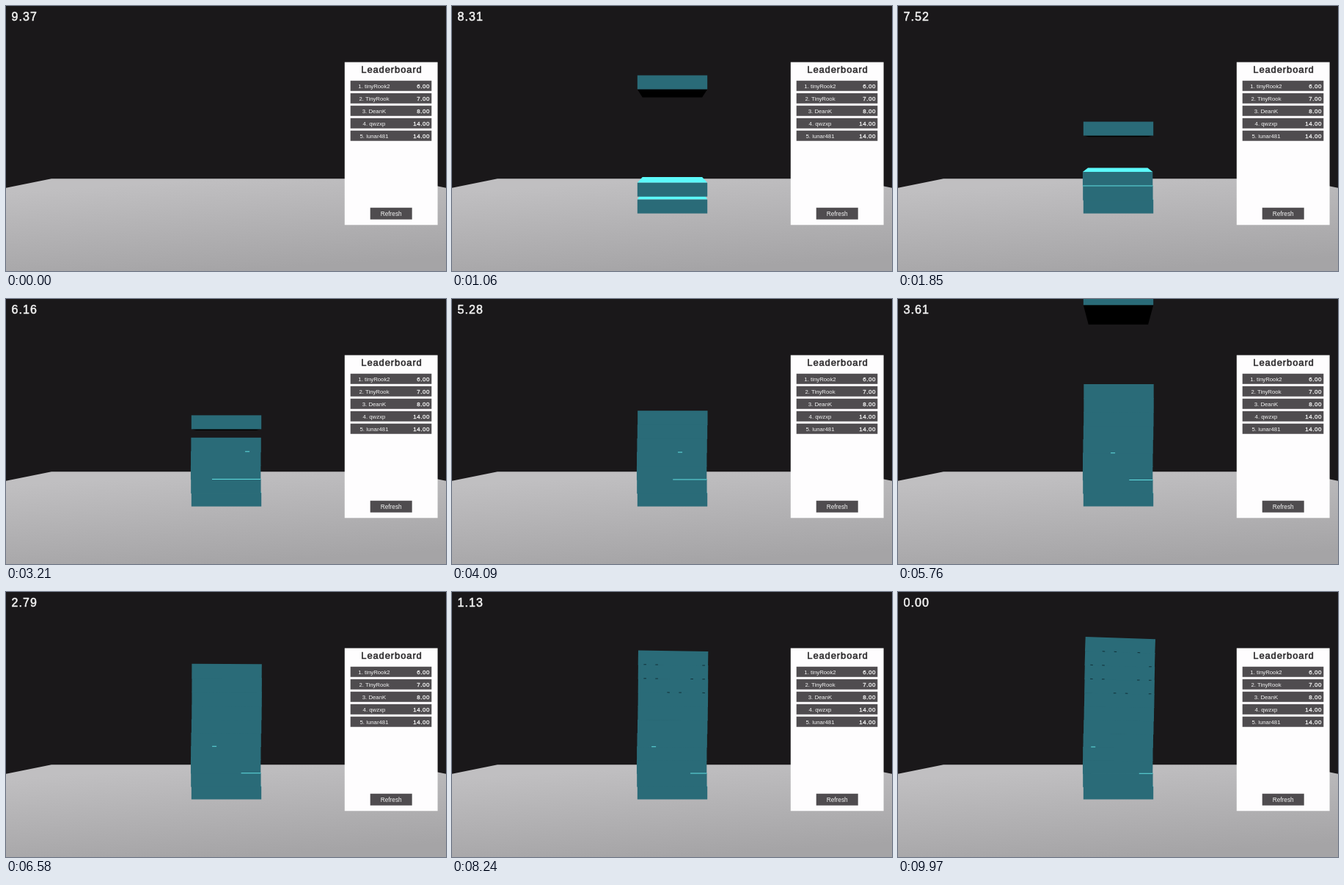
Write an HTML page with a canvas that moves like this. It is 600 by 361 pixels and loops after 10000 ms.

```html
<!DOCTYPE html>
<html lang="en">
<head>
<meta charset="utf-8">
<title>Block stacking game</title>
<style>
  html, body { margin: 0; width: 100%; height: 100%; overflow: hidden; background: #1a181a; }
  svg, canvas { position: absolute; left: 0; top: 0; width: 600px; height: 361px; }
  text { font-family: "Liberation Sans", Arial, sans-serif; }
  .bold { stroke-width: .55px; letter-spacing: .068em; }
  .light { fill: #f2f2f2; }
  .light.bold { stroke: #f2f2f2; }
  .title { fill: #2b292b; stroke: #2b292b; }
  .name { font-size: 7.8px; text-anchor: middle; }
  .score { font-size: 8px; text-anchor: end; stroke-width: .3px; }
</style>
</head>
<body>
<svg viewBox="0 0 600 361">
  <defs>
    <linearGradient id="floor" gradientUnits="userSpaceOnUse" x1="296" y1="235" x2="304" y2="361">
      <stop offset="0" stop-color="#c0bfc1"/>
      <stop offset="1" stop-color="#a5a4a6"/>
    </linearGradient>
  </defs>
  <path d="M0 247.8 62 235.2H538L600 247.8V361H0Z" fill="url(#floor)"/>
</svg>
<canvas id="tower" width="600" height="361"></canvas>
<svg viewBox="0 0 600 361">
  <text id="clock" class="light bold" x="7.5" y="20" font-size="16">9.37</text>
  <path d="M461.8 76.6H588.6V298.3H461.8Z" fill="#fefdfe"/>
  <text class="title bold" x="526" y="91.3" font-size="13" text-anchor="middle">Leaderboard</text>
  <g id="rows"></g>
  <path d="M496.7 274.8H553.7V290.8H496.7Z" fill="#4f4c4f"/>
  <text class="light" x="525.2" y="286" font-size="8.3" text-anchor="middle">Refresh</text>
</svg>
<script>
const LOOP = 10000, START = 9.37;
const CENTER = 300.5, BASE = 282.6, WIDTH = 95.4, HEIGHT = 19;
const SQUASH = .122, DROP = 135, GRAVITY = 930;
const HORIZON = 188, DEPTH = .853;
const FRONT = '#2a6b78', TOP = '#5cf9fa', UNDER = '#000', GLINT = '#62dfe2', GAP = '#123038';

// Moments at which the player releases a block.
const drops = [100, 530, 970, 1421, 2060, 2693, 3400, 4160, 4729, 5500, 6640, 8420];

const players = [['tinyRook2', 6], ['TinyRook', 7], ['DeanK', 8], ['qwzxp', 14], ['lunar481', 14]];
document.getElementById('rows').innerHTML = players.map(([name, score], i) => {
  const y = 101.8 + 17 * i;
  return `<path d="M469.7 ${y}h110.6v14h-110.6Z" fill="#4f4c4f"/>
    <text class="light name" x="502" y="${y + 9.8}">${i + 1}. ${name}</text>
    <text class="light bold score" x="578" y="${y + 10}">${score.toFixed(2)}</text>`;
}).join('');

const ctx = document.getElementById('tower').getContext('2d');
const clock = document.getElementById('clock');
const clamp = v => Math.max(0, Math.min(1, v));
const random = seed => Math.abs(Math.sin(seed * 127.1) * 43758.5453) % 1;

const fallTime = 1000 * Math.sqrt(2 * DROP / GRAVITY);
const age = (i, t) => t - drops[i] - fallTime;
const settled = (i, t) => clamp(age(i, t) / 150);
const slip = i => -1.2 * Math.sin(i * Math.PI / 5) * Math.exp(-i / 8);

// The tower leans more and more, and sways after each landing.
function leanAt(t) {
  const last = drops.filter((_, i) => age(i, t) > 0).length - 1;
  if (last < 0) return 0;
  const a = age(last, t) / 1000;
  const sway = 1 + .4 * Math.sin(Math.PI * a) * Math.exp(-a);
  return .036 * clamp((t - 4900) / 5070) ** 1.6 * sway;
}

// A horizontal face in perspective, from its front edge to its back edge.
function face(x, y, color) {
  const back = HORIZON + (y - HORIZON) * DEPTH;
  const mid = 300 + (x - 300) * DEPTH, half = WIDTH / 2;
  ctx.fillStyle = color;
  ctx.beginPath();
  ctx.moveTo(x - half, y);
  ctx.lineTo(mid - half * DEPTH, back);
  ctx.lineTo(mid + half * DEPTH, back);
  ctx.lineTo(x + half, y);
  ctx.fill();
}

// Light shows through the low seams, closing under load; high seams gape as the tower leans.
function drawSeam(i, load, lean) {
  const line = (x, w, color) => {
    ctx.fillStyle = color;
    ctx.fillRect(x, -.5, w, 1);
  };
  if (i === 2) {
    const w = WIDTH * Math.exp(-load / 5.5);
    line(WIDTH / 2 - w, w, GLINT);
  }
  if (i === 4) line(26 - 9 * load, 6, GLINT);
  if (i >= 8 && lean > .015) {
    for (let k = 0; k < 6; k++) {
      if (random(i * 6 + k) < .55) line(16 * k - 40, 3.5, GAP);
    }
  }
}

function drawBlock(i, x, y, h, angle, rest, load, lean) {
  if (y - h > HORIZON) face(x, y - h, TOP);
  if (y < HORIZON && !rest) face(x, y, UNDER);
  ctx.save();
  ctx.translate(x, y);
  ctx.rotate(angle);
  ctx.fillStyle = FRONT;
  ctx.fillRect(-WIDTH / 2, -h, WIDTH, h + (rest && i ? .8 : 0));
  if (rest) drawSeam(i, load, lean);
  ctx.restore();
}

function drawTower(t) {
  ctx.clearRect(0, 0, 600, 361);
  const lean = leanAt(t);
  let top = BASE, shift = 0;
  drops.forEach((start, i) => {
    if (t < start) return;
    const load = drops.reduce((sum, _, j) => sum + (j > i ? settled(j, t) : 0), 0);
    const rest = settled(i, t);
    const h = HEIGHT - SQUASH * load;
    const angle = rest * lean * ((i + 1) / 12) ** 2;
    const s = (t - start) / 1000;
    const fallen = BASE - HEIGHT * i - DROP + GRAVITY * s * s / 2;
    const y = rest ? top : Math.min(top, fallen);
    drawBlock(i, CENTER + rest * (slip(i) + shift), y, h, angle, rest, load, lean);
    top = y - h;
    shift += angle * h;
  });
}

function render() {
  const t = performance.now() % LOOP;
  clock.textContent = Math.max(0, START - t / 1000).toFixed(2);
  drawTower(t);
  requestAnimationFrame(render);
}
render();
</script>
</body>
</html>
```
